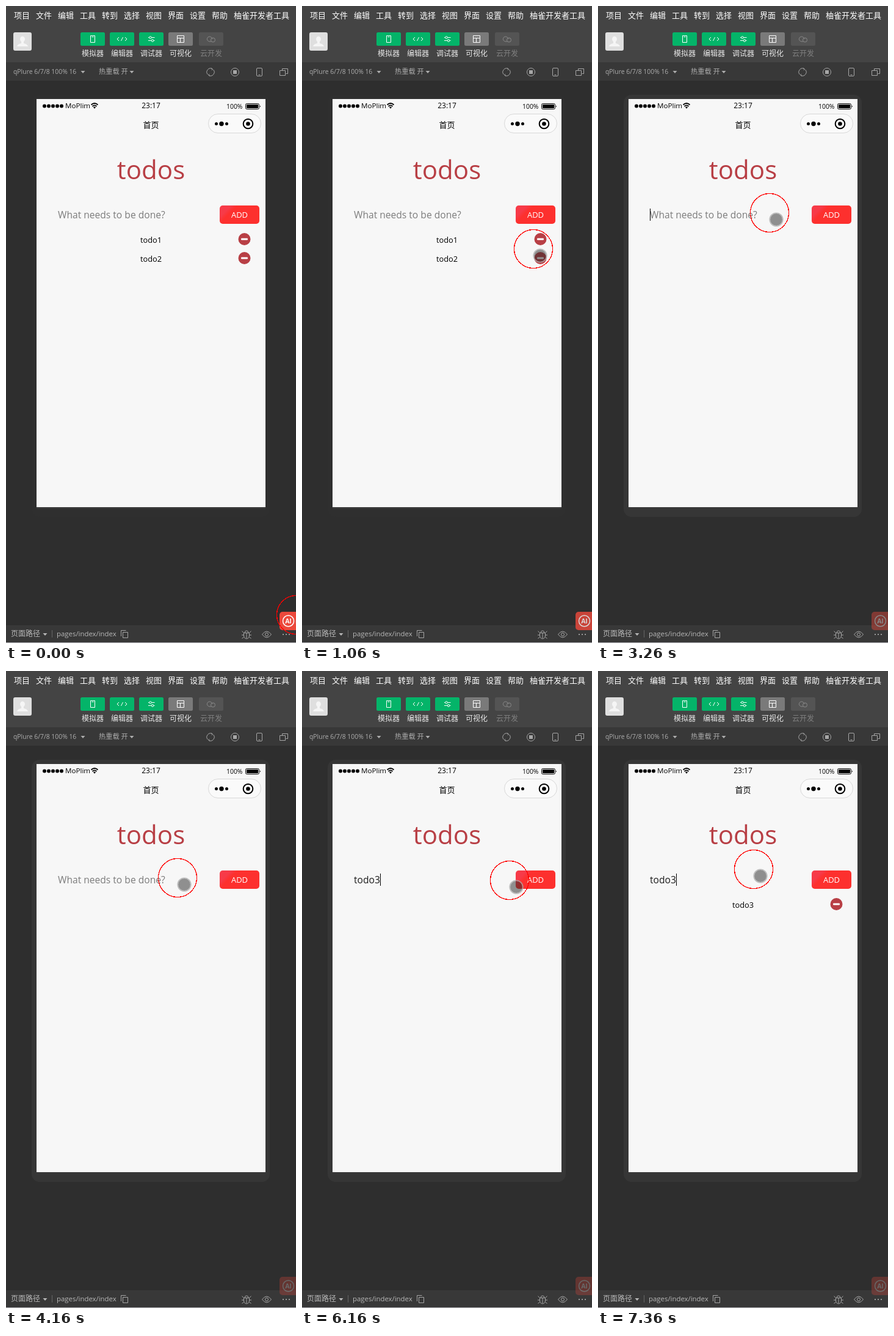
An HTML page for the animation above (8 s loop, 475 by 1041 pixels).

```html
<!DOCTYPE html>
<html lang="zh-CN">
<head>
<meta charset="utf-8">
<title>todos</title>
<style>
  html, body { margin: 0; width: 100%; height: 100%; overflow: hidden; background: #2e2e2e; }
  svg { display: block; font-family: "Open Sans", "Noto Sans CJK SC", "Noto Sans CJK", sans-serif; }
  .mid { text-anchor: middle; }
  .line { fill: none; stroke: #a6a6a6; }
  .white { fill: none; stroke: #fff; }
</style>
</head>
<body>
<svg width="475" height="1041" viewBox="0 0 475 1041">
  <defs>
    <linearGradient id="add" gradientUnits="userSpaceOnUse" x1="350" y1="326" x2="382" y2="358">
      <stop offset=".3" stop-color="#f73a48"/><stop offset=".45" stop-color="#fd302e"/>
    </linearGradient>
    <g id="minus">
      <circle r="10" fill="#b83f45"/>
      <rect x="-5.5" y="-1.5" width="11" height="3" rx="1" fill="#fff"/>
    </g>
    <path id="arrow" d="M-3.500-2h7L0 2z"/>
  </defs>

  <!-- window chrome -->
  <rect width="475" height="1041" fill="#2e2e2e"/>
  <rect width="475" height="92" fill="#444"/>
  <rect y="92" width="475" height="30" fill="#383838"/>
  <rect y="1012" width="475" height="29" fill="#383838"/>
  <rect y="1040" width="475" height="1" fill="#b4b4b8"/>
  <g id="menu" font-size="13" fill="#fff"></g>
  <rect x="12" y="43" width="30" height="30" rx="3" fill="#dfdfdf"/>
  <path d="M18 66q1-4 7-5v-3a4 4.500 0 1 1 4 0v3q6 1 7 5z" fill="#f5f5f5"/>
  <g id="tools" class="mid" font-size="12"></g>
  <g class="white">
    <path d="M138.500 48.500h7v11h-7zM140.500 50.500h3"/>
    <path d="M185 51l-3 3 3 3M195 51l3 3-3 3M191.500 51l-3 6"/>
    <path d="M233 51.500h1.500M238.500 51.500h5M233 56.500h5M242 56.500h1.500"/>
    <circle cx="236.500" cy="51.500" r="1.800"/><circle cx="240" cy="56.500" r="1.800"/>
    <path d="M280.500 48.500h11v11h-11zM280.500 52.500h11M285.500 52.500v7"/>
    <g stroke="#888"><path d="M336 58h-3a4 4 0 1 1 3-7q2 1 2 3"/><circle cx="339" cy="55.500" r="3.500"/></g>
  </g>

  <g fill="#adadad" font-size="10.400">
    <text x="12" y="111">qPlure 6/7/8 100% 16</text>
    <text x="152" y="111" font-size="11.200">热重载 开</text>
    <use href="#arrow" x="126" y="108"/><use href="#arrow" x="206" y="108"/>
  </g>
  <g class="line">
    <path d="M330.500 112a6 6 0 0 1 7.500-9.200M339.500 104a6 6 0 0 1-7.500 9.200M336 101.500l2.500 1.500-1.500 2M334 114.500l-2.500-1.500 1.500-2"/>
    <circle cx="375" cy="108" r="6.500"/><rect x="372" y="105" width="6" height="6" fill="#a6a6a6" stroke="none"/>
    <rect x="410.500" y="101.500" width="9" height="13" rx="1.500"/><path d="M413.500 112.500h3"/>
    <path d="M452.500 105v-2.500h9v8h-3M448.500 105.500h9v8h-9z"/>
  </g>

  <!-- phone -->
  <rect id="bezel" x="42" y="145" width="390" height="690" rx="13"/>
  <rect x="50" y="819" width="375" height="3" fill="#383838"/>
  <rect x="50" y="152" width="375" height="667" fill="#f7f7f7"/>
  <g id="signal"></g>
  <text x="97" y="167" font-size="11.600">MoPlim</text>
  <path d="M139.500 161.500q5.500-5 11 0M141.500 164q3.500-3.200 7 0" fill="none" stroke="#000" stroke-width="1.700"/>
  <path d="M143 165.500q2-1.800 4 0l-2 2.300z"/>
  <text x="237.500" y="167" class="mid" font-size="12">23:17</text>
  <text x="361" y="168" font-size="10.400">100%</text>
  <rect x="392.500" y="159.500" width="22" height="9" rx="2" fill="none" stroke="#000"/>
  <path d="M394 161h19v6h-19zM416 162.500q2 1.500 0 3z"/>
  <text x="237.500" y="199" class="mid" font-size="13">首页</text>
  <rect x="331.500" y="176.500" width="86" height="31" rx="15.500" fill="#fafafa" stroke="#d8d8d8"/>
  <circle cx="344.500" cy="192.500" r="2.500"/><circle cx="353" cy="192.500" r="3.700"/><circle cx="361.500" cy="192.500" r="2.500"/>
  <circle cx="396.500" cy="192.500" r="7.800" fill="none" stroke="#000" stroke-width="2"/><circle cx="396.500" cy="192.500" r="3.300"/>

  <!-- app -->
  <text x="237.500" y="283" class="mid" font-size="42" fill="#b83f45">todos</text>
  <text id="entry" x="85" y="347" font-size="15.600"></text>
  <rect id="caret" y="331" width="1" height="20"/>
  <rect x="350" y="326" width="65" height="30" rx="5" fill="url(#add)"/>
  <text x="382.500" y="346" class="mid" font-size="13" font-weight="500" fill="#fff">ADD</text>
  <g id="row1"><text id="name1" x="237.500" y="387" class="mid" font-size="12.800"></text><use href="#minus" x="390.500" y="381"/></g>
  <g id="row2"><text x="237.500" y="418" class="mid" font-size="12.800">todo2</text><use href="#minus" x="390.500" y="412"/></g>

  <!-- bottom bar -->
  <g fill="#b8b8b8">
    <text x="8" y="1030" font-size="12">页面路径</text>
    <use href="#arrow" x="64" y="1027"/>
    <rect x="75" y="1020" width="1" height="12" fill="#666"/>
    <text x="83" y="1030" font-size="11.400">pages/index/index</text>
    <circle cx="454" cy="1027" r="1"/><circle cx="459" cy="1027" r="1"/><circle cx="464" cy="1027" r="1"/>
  </g>
  <g class="line">
    <path d="M191.500 1023.500h8v9h-8zM188.500 1030v-9.500h8"/>
    <path d="M389.500 1024.500h9v4.500a4.500 5 0 0 1-9 0zM391 1024.500a3 3.500 0 0 1 6 0M394 1025v8M386 1028h3M399 1028h3M386.500 1021.500l3 3M401.500 1021.500l-3 3M386.500 1033.500l3-2M401.500 1033.500l-3-2"/>
    <path d="M419.500 1027q7.500-10 15 0q-7.500 10-15 0z"/><circle cx="427" cy="1027" r="2.500"/>
  </g>

  <g id="helper">
    <rect x="448" y="990" width="40" height="30" rx="5" fill="#ec493c"/>
    <circle cx="462.500" cy="1005" r="9" class="white" stroke-width="1.500"/>
    <text x="462.500" y="1008.800" class="mid" font-size="10.500" font-weight="700" fill="#fff">AI</text>
  </g>

  <g id="pointer">
    <circle cx="11" cy="11" r="10" fill="#282828" fill-opacity=".5"/>
    <circle cx="11" cy="11" r="10.700" fill="none" stroke="#aaa" stroke-opacity=".75" stroke-width="1.800"/>
    <circle r="31.500" fill="none" stroke="#f00" stroke-width="1.250" shape-rendering="crispEdges"/>
  </g>
</svg>
<script>
const $ = id => document.getElementById(id);
const LOOP = 8000, STEP = 100;

$('menu').innerHTML = '项目 文件 编辑 工具 转到 选择 视图 界面 设置 帮助 柚雀开发者工具'.split(' ')
  .map((s, i) => `<text x="${13 + 36 * i}" y="20">${s}</text>`).join('');

$('tools').innerHTML = [
  ['模拟器', 142, '#04b469'], ['编辑器', 190, '#04b469'], ['调试器', 238, '#04b469'],
  ['可视化', 286, '#7a7a7a'], ['云开发', 336, '#545454', '#808080'],
].map(([label, x, color, ink = '#e8e8e8']) =>
  `<rect x="${x - 20}" y="43" width="40" height="22" rx="2.5" fill="${color}"/>
   <text x="${x}" y="82" fill="${ink}">${label}</text>`).join('');

$('signal').innerHTML = [0, 1, 2, 3, 4]
  .map(i => `<circle cx="${63 + 7 * i}" cy="163.500" r="3"/>`).join('');

// start time, number of 100 ms steps, target x, target y
const moves = [
  [100, 1, 442, 896], [260, 9, 379, 397], [1660, 4, 379, 372],
  [2260, 6, 281, 338], [3960, 1, 284, 341], [4160, 1, 281, 338],
  [5960, 3, 340, 342], [6360, 3, 366, 336], [6760, 5, 255, 324],
];
const typing = [4460, 4560, 4760, 4960, 5560];
const fade = [[0, 1], [260, 1], [1060, .82], [2360, .58], [2760, .5], [3259, .5],
  [3260, .43], [3759, .43], [3760, .36], [4159, .36], [4160, .28], [LOOP, .28]];

function pointerAt(t) {
  let x = 475, y = 995;
  for (const [start, steps, toX, toY] of moves) {
    if (t < start) break;
    const k = Math.min(Math.floor((t - start) / STEP) + 1, steps) / steps;
    const p = k * k * (3 - 2 * k);
    x += (toX - x) * p;
    y += (toY - y) * p;
  }
  return [Math.round(x), Math.round(y)];
}

function fadeAt(t) {
  const i = fade.findIndex(([time]) => time > t);
  const [t0, a] = fade[i - 1], [t1, b] = fade[i];
  return a + (b - a) * (t - t0) / (t1 - t0);
}

const show = (id, on) => $(id).setAttribute('visibility', on ? 'visible' : 'hidden');

function draw(t) {
  const typed = 'todo3'.slice(0, typing.filter(time => t >= time).length);
  const entry = $('entry');
  entry.textContent = typed || 'What needs to be done?';
  entry.setAttribute('fill', typed ? '#1c1c1c' : '#7c7c7c');
  $('caret').setAttribute('x', typed ? Math.round(85 + entry.getComputedTextLength()) : 85);
  show('caret', t >= 2960 && t < 3760 || t >= 4460 && t < 6560 || t >= 7360);

  $('name1').textContent = t < 2060 ? 'todo1' : 'todo3';
  show('row1', t < 2060 || t >= 6760);
  show('row2', t < 1460);

  $('bezel').setAttribute('fill', t < 1460 ? '#2f2f2f' : '#363636');
  $('helper').setAttribute('opacity', fadeAt(t));
  $('pointer').setAttribute('transform', `translate(${pointerAt(t)})`);
}

const begin = performance.now();
(function tick() {
  draw((performance.now() - begin) % LOOP);
  requestAnimationFrame(tick);
})();
</script>
</body>
</html>
```
